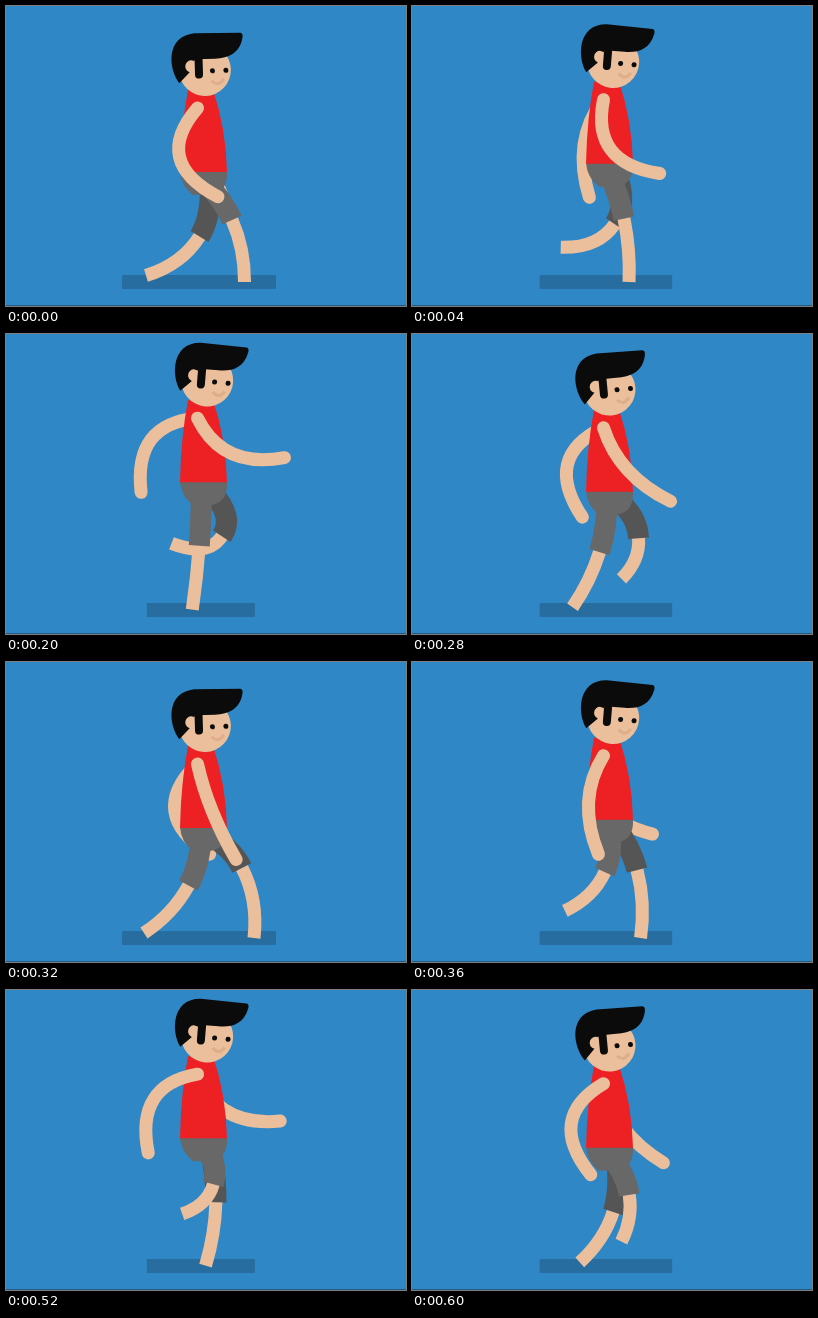
These frames come from a looping animation (400x300 px, 0.64 s). An HTML page with a canvas:

```html
<!DOCTYPE html>
<html lang="en">
<head>
<meta charset="utf-8">
<title>Walk cycle</title>
<style>
html, body { margin: 0; width: 400px; height: 300px; overflow: hidden; background: #3087c6; }
canvas { display: block; }
</style>
</head>
<body>
<canvas id="stage" width="400" height="300"></canvas>
<script>
const ctx = document.getElementById('stage').getContext('2d');
const STEP = 40, COUNT = 16, HALF = 8;
const SKIN = '#ebbf9c', NEAR = '#686868', FAR = '#555', HAIR = '#0b0b0b';

// Four key poses per cycle. Legs: front contact, standing, rear contact, lifted.
// Each leg pose is knee x, y and foot x, y.
const nearLeg = [[226, 214, 238.5, 276], [194, 211, 189.5, 276], [182.5, 223.5, 138, 271], [206, 193, 172, 220.5]];
const farLeg = [[236, 206, 248, 276], [211, 211, 203.5, 276], [193.5, 230.5, 140, 269.5], [214.5, 202, 160, 205]];
// Arms: swing angle, length, bend, for swinging forward, front, swinging back, rear.
const arm = [[13, 91, 57], [68.5, 95, 38], [22, 103, 8], [-35, 93, 47]];

// Blend key poses: slow down into the raised poses, speed up into the contacts.
function pose(keys, step) {
  const k = step % COUNT, i = Math.floor(k / 4), v = k % 4 / 4;
  const w = i % 2 ? v * v : v * (2 - v);
  const next = keys[(i + 1) % 4];
  return keys[i].map((a, j) => a + (next[j] - a) * w);
}

function stroke(d, color, width, cap = 'butt') {
  ctx.strokeStyle = color;
  ctx.lineWidth = width;
  ctx.lineCap = cap;
  ctx.lineJoin = 'round';
  ctx.stroke(new Path2D(d));
}

function fillPath(d, color) {
  ctx.fillStyle = color;
  ctx.fill(new Path2D(d));
}

function dot(x, y, r, color) {
  ctx.fillStyle = color;
  ctx.beginPath();
  ctx.arc(x, y, r, 0, 7);
  ctx.fill();
}

function drawArm(k, x, y, lean) {
  const [angle, length, bend] = pose(arm, k);
  const a = (angle + lean) * Math.PI / 180, s = Math.sin(a), c = Math.cos(a);
  const along = length * 0.46;
  const elbow = [x + s * along - c * bend, y + c * along + s * bend];
  stroke(`M${x},${y}Q${elbow} ${x + s * length},${y + c * length}`, SKIN, 13, 'round');
}

// Thigh and shin share one tangent at the knee, halfway between their directions.
function drawLeg(keys, k, x, y, color) {
  const [kx, ky, fx, fy] = pose(keys, k);
  const thigh = Math.atan2(ky - y, kx - x), shin = Math.atan2(fy - ky, fx - kx);
  const a = (thigh + shin) / 2, half = Math.hypot(fx - kx, fy - ky) / 2;
  const at = d => [kx + d * Math.cos(a), ky + d * Math.sin(a)];
  stroke(`M${at(-4)}L${kx},${ky}Q${at(half)} ${fx},${fy}`, SKIN, 13);
  stroke(`M${x},${y}Q${at(-24)} ${kx},${ky}`, color, 21);
}

function drawHead(k) {
  const c = Math.cos((k - 3) * Math.PI / 4);
  const tilt = 4.7 + 6.35 * c - 3.8 * c * c;
  ctx.translate(197, 85);
  ctx.rotate(tilt * Math.PI / 180);
  ctx.translate(-197, -85);
  dot(199.5, 64, 26, SKIN);
  fillPath('M173.5,76.5C163,62 161,29 190,27L236,28Q239,28.5 238,33C235,48 224,53 210,53H190L184,66Z', HAIR);
  dot(186, 60, 6, SKIN);
  stroke('M193.5,50V68.5', HAIR, 8, 'round');
  dot(207, 65, 2.5, HAIR);
  dot(220.5, 65, 2.5, HAIR);
  stroke('M206,75Q213,82 218,73.5', '#deae88', 3);
}

function draw(k) {
  const low = (1 - k % HALF / 4) ** 2;   // 1 at contact, 0 at the top of the bounce
  const hip = 147 + 19 * low;

  ctx.fillStyle = '#3087c6';
  ctx.fillRect(0, 0, 400, 300);
  ctx.fillStyle = '#1f5a86';
  ctx.fillRect(0, 299, 400, 1);
  ctx.fillStyle = '#286d9f';
  ctx.fillRect(142.5 - 26.5 * low, 269, 105 + 49 * low, 14);

  drawArm(k + HALF, 191, hip - 64, -5);
  drawLeg(farLeg, k + HALF, 204, hip + 8, FAR);
  drawLeg(nearLeg, k, 195.5, hip + 6, NEAR);

  ctx.save();
  ctx.translate(0, hip - 166);
  fillPath('M174,165H221V170Q220,187 204,189L187,189Q175,180 174,165Z', NEAR);
  fillPath('M174,166Q175,120 182,84H207Q220,122 221,166Z', '#ed2024');
  drawHead(k);
  ctx.restore();

  drawArm(k, 191.5, hip - 64, 0);
}

function tick() {
  draw(Math.floor(performance.now() / STEP) % COUNT);
  requestAnimationFrame(tick);
}
tick();
</script>
</body>
</html>
```
